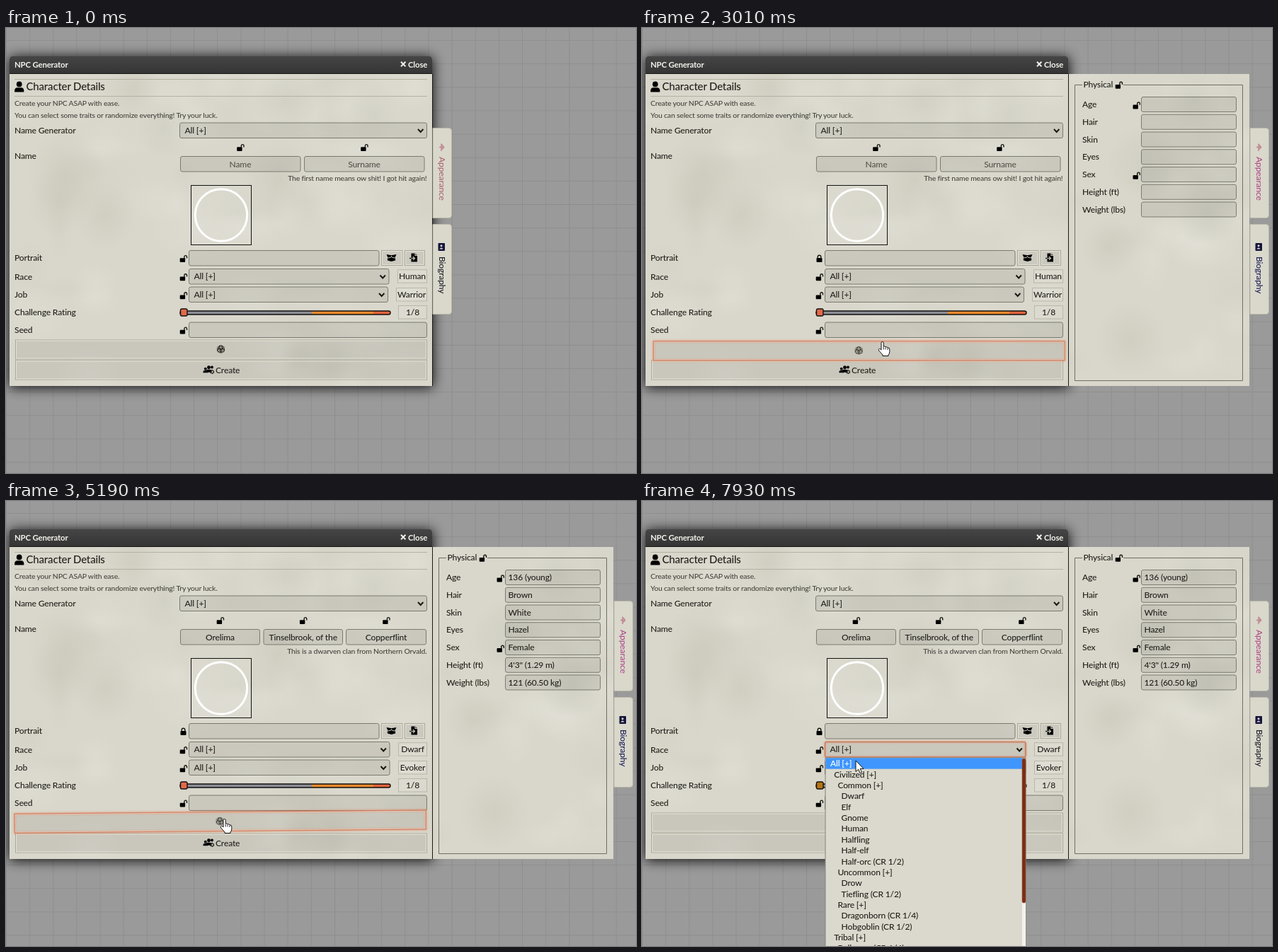
An HTML page for the animation above (8 s loop, 890 by 629 pixels).

```html
<!DOCTYPE html>
<html lang="en">
<head>
<meta charset="utf-8">
<title>NPC Generator</title>
<style>
  html, body { margin: 0; width: 100%; height: 100%; overflow: hidden; background: #9a9a9a; }
  svg { display: block; width: 890px; height: 629px; }
  text { font: 500 12.1px Lato, "Open Sans", sans-serif; letter-spacing: -.17px; fill: #22211c; white-space: pre; }
  .note { font-size: 10.4px; fill: #45443e; }
  .title { font-size: 11.4px; font-weight: bold; fill: #f2f1ea; }
  .heading { font-size: 15px; }
  .hint { fill: #55544c; }
  .box { fill: #000; fill-opacity: .07; stroke: #7b7a71; }
  .badge { fill: #fff; fill-opacity: .08; stroke: #b9b7a9; }
  .line { fill: none; stroke: #191813; stroke-width: 1.4; }
  .glow rect { fill: none; stroke: #e8683f; }
</style>
</head>
<body>
<svg viewBox="0 0 890 629">
  <defs>
    <radialGradient id="dark"><stop offset="0" stop-color="#b4b4a4"/><stop offset="1" stop-color="#b4b4a4" stop-opacity="0"/></radialGradient>
    <radialGradient id="light"><stop offset="0" stop-color="#e9e8e1"/><stop offset="1" stop-color="#e9e8e1" stop-opacity="0"/></radialGradient>
    <linearGradient id="header" x2="0" y2="1"><stop offset="0" stop-color="#454545"/><stop offset="1" stop-color="#343434"/></linearGradient>
    <pattern id="grid" width="33.14" height="33.14" patternUnits="userSpaceOnUse" y="17">
      <path d="M0 .5H34M.5 0V34" stroke="#8e8e8e"/>
    </pattern>
    <filter id="blur" x="-10%" y="-10%" width="120%" height="120%"><feGaussianBlur stdDeviation="9"/></filter>
    <clipPath id="mainClip"><rect x="5" y="65" width="597" height="441"/></clipPath>
    <clipPath id="sideClip"><rect x="603" y="65" width="255" height="441"/></clipPath>
  </defs>
  <g id="stage"></g>
</svg>
<script>
const LOOP = 8000;
const byId = id => document.getElementById(id);

// ---- drawing helpers (text y is the middle of the line) ----
const text = (x, y, s, cls = '', more = '') => `<text x="${x}" y="${y + 4.2}" class="${cls}" ${more}>${s}</text>`;
const centred = (x, y, s, cls) => text(x, y, s, cls, 'text-anchor="middle"');
const rightNote = s => text(594.5, 211.4, s, 'note', 'text-anchor="end"');
const rect = (x, y, w, h, more = '') => `<rect x="${x}" y="${y}" width="${w}" height="${h}" ${more}/>`;
const path = (d, more = '') => `<path d="${d}" ${more}/>`;
const group = (id, body, more = '') => `<g id="${id}" ${more}>${body}</g>`;
const at = (x, y, body) => `<g transform="translate(${x} ${y})">${body}</g>`;
const box = (x, y, w, h = 21.5) => rect(x, y, w, h, 'rx="2.5" class="box"');
const badge = (x, y, s) => rect(x, y - 9.5, 594.5 - x, 18.5, 'class="badge"') + centred((x + 594.5) / 2, y, s);
const select = (x, y, w) => box(x, y, w) + text(x + 7, y + 10.5, 'All [+]') +
  path(`M${x + w - 12.5} ${y + 9}l3.7 4 3.7-4`, 'class="line" style="stroke-width:2"');
const openLock = (x, y) => at(x, y, rect(-4.8, -.6, 7.4, 5.8, 'rx="1"') + path('M1.4 0V-2.4a1.8 1.8 0 0 1 3.6 0V-.4', 'class="line"'));
const closedLock = (x, y) => at(x, y, rect(-4, -.8, 8, 6, 'rx="1"') + path('M-2.3 0V-2.2a2.3 2.3 0 0 1 4.6 0V0', 'class="line"'));
const glow = (id, x, y, w, h, r = 1) => group(id,
  [[7, .06], [4.5, .1], [2.5, .18], [1, .45]].map(([sw, o]) =>
    rect(x, y, w, h, `rx="${r}" stroke-width="${sw}" stroke-opacity="${o}"`)).join(''), 'class="glow"');
const button = (x, y, w, h) => rect(x, y, w, h, 'fill="#000" fill-opacity=".075" stroke="#a5a496"') +
  rect(x + 1, y + 1, w - 2, h - 2, 'fill="none" stroke="#efede2" stroke-opacity=".8"');

let seed = 7;
const random = () => (seed = seed * 16807 % 2147483647) / 2147483647;
const blob = (x, y, rx, ry, tone, o) => `<ellipse cx="${x}" cy="${y}" rx="${rx}" ry="${ry}" fill="url(#${tone})" opacity="${o}"/>`;

function parchment(x, w, clip, stains) {
  let out = rect(x, 65, w, 441, 'fill="#d9d7cb"');
  for (let i = 0; i < w / 9; i++)
    out += blob(x + random() * w, 65 + random() * 441, 20 + random() * 50, 15 + random() * 40, i % 3 ? 'light' : 'dark', i % 3 ? .25 : .1);
  for (const [sx, sy, r] of stains) out += blob(sx, sy, r, r * 1.1, 'dark', .24);
  return `<g clip-path="url(#${clip})">${out}</g>`;
}

const person = (x, y, s) => `<g transform="translate(${x} ${y}) scale(${s})"><circle cy="-3.6" r="3.9"/>` +
  path('M-6.6 7.5V5.4Q-6.6 1.4-2.6 1.2H2.6Q6.6 1.4 6.6 5.4V7.5Z') + '</g>';
const d20 = at(303.5, 454, path('M0-6.2 5.4-3.1V3.1L0 6.2-5.4 3.1V-3.1Z', 'fill="#191813"') +
  path('M0-2.8 3 2.2H-3ZM0-6V-2.8M3 2.2 5 3M-3 2.2-5 3M0-2.8 5-3M0-2.8-5-3M3 2.2 5-3M-3 2.2-5-3M3 2.2 0 6-3 2.2', 'fill="none" stroke="#c9c8bb" stroke-width=".8"'));

// ---- window pieces ----
function mainWindow() {
  const stains = [[85, 205, 55], [75, 245, 45], [180, 85, 40], [395, 105, 45], [385, 215, 50], [225, 140, 40], [140, 265, 45], [520, 120, 40]];
  const labels = [['Name Generator', 144.5], ['Name', 180.5], ['Portrait', 324.5], ['Race', 351.5], ['Job', 377], ['Challenge Rating', 401.8], ['Seed', 426.5]];
  return rect(5, 41, 598, 467, 'fill="#000" opacity=".92" filter="url(#blur)"') +
    path('M5 65V45Q5 40 10 40H597Q602 40 602 45V65Z', 'fill="url(#header)"') +
    parchment(5, 597, 'mainClip', stains) +
    path('M5 64.5H602M602.5 65V506', 'stroke="#191813"') +
    text(12, 51.5, 'NPC Generator', 'title') + text(568, 51.5, 'Close', 'title') +
    path('M558 47.8l6.4 6.6M564.4 47.8l-6.4 6.6', 'stroke="#f2f1ea" stroke-width="2"') +
    path('M12 72.5H595M12 96.5H595', 'stroke="#b3b1a2"') +
    person(18.7, 83, 1) + text(28.5, 84, 'Character Details', 'heading') +
    text(12, 106.2, 'Create your NPC ASAP with ease.', 'note') +
    text(12, 122.6, 'You can select some traits or randomize everything! Try your luck.', 'note') +
    labels.map(([s, y]) => text(12, y, s)).join('') +
    select(245.5, 134, 349) +
    rect(261.5, 222.5, 85, 84, 'fill="#fff" fill-opacity=".06" stroke="#111"') +
    '<circle cx="304" cy="264.5" r="36.7" fill="none" stroke="#fff" stroke-width="3"/>' +
    box(258.5, 314.5, 268.5) + button(530.5, 314.5, 29.5, 21) + button(563.5, 314.5, 28, 21) +
    at(544.5, 324.5, path('M-7-4.5 0-3.2 7-4.5 5 0 1.5-.6 0-2.6-1.5-.6-5 0ZM-5.6 1-1.5.6 0-1 1.5.6 5.6 1V4L0 5.5-5.6 4Z')) +
    at(576, 324.5, path('M-3.5-6H2L5-3V6H-3.5Z') + path('M-6 1H1M-1.2-1.5 1.5 1-1.2 3.5M2-6V-3H5', 'fill="none" stroke="#c9c8bb" stroke-width="1.2"') + path('M-6 1H-3.5', 'class="line"')) +
    group('portraitOpen', openLock(250.5, 325.8)) + group('portraitClosed', closedLock(250.5, 325.8)) +
    [352, 378, 427.3].map(y => openLock(250.5, y)).join('') +
    box(258.5, 416, 336) + badge(554.5, 402, '1/8') +
    rect(246, 400, 297, 5, 'rx="2.5" fill="#8d8d95"') + rect(432, 400, 88, 5, 'fill="#ea8a2c"') +
    rect(519, 400, 24, 5, 'rx="2" fill="#e2633d"') +
    rect(246, 400, 297, 5, 'rx="2.5" fill="none" stroke="#111" stroke-width="1.4"') +
    rect(246.5, 397, 9.5, 10, 'id="thumb" rx="2" stroke="#111" stroke-width="1.4"') +
    button(13.5, 470, 581, 27) + glow('createGlow', 13.5, 470, 581, 27) +
    person(286.5, 482, .62) + person(281.8, 483.5, .5) +
    '<circle cx="291.2" cy="486" r="2.2" fill="none" stroke="#191813" stroke-width="1.7" stroke-dasharray="1.6 .5"/><circle cx="291" cy="479.5" r="2"/>' +
    text(296, 483.5, 'Create') +
    group('dice', button(13.5, 441, 581, 27) + glow('diceGlow', 13.5, 441, 581, 27) + group('diceIcon', d20));
}

const emptyForm = [331, 506].map(x => openLock(x, 168.8)).join('') +
  box(246.5, 181.5, 169.5) + box(421.5, 181.5, 169.5) +
  centred(331, 192.3, 'Name', 'hint') + centred(506, 192.3, 'Surname', 'hint') +
  rightNote('The first name means ow shit! I got hit again!') +
  select(258.5, 340.5, 282.5) + badge(553.5, 351.2, 'Human') +
  select(258.5, 366, 281) + badge(551.5, 377, 'Warrior');

const filledForm = [['Orelima', 246.5, 112], ['Tinselbrook, of the', 364, 111.5], ['Copperflint', 480.5, 113]]
    .map(([s, x, w]) => box(x, 181.5, w) + centred(x + w / 2, 192.3, s) + openLock(x + w / 2, 168.8)).join('') +
  rightNote('This is a dwarven clan from Northern Orvald.') +
  select(258.5, 340.5, 283.5) + badge(554.5, 351.2, 'Dwarf') +
  select(258.5, 366, 283.5) + badge(554.5, 377, 'Evoker');

const traits = [['Age', '136 (young)'], ['Hair', 'Brown'], ['Skin', 'White'], ['Eyes', 'Hazel'],
  ['Sex', 'Female'], ['Height (ft)', '4\'3" (1.29 m)'], ['Weight (lbs)', '121 (60.50 kg)']];
const traitY = i => 108 + i * 24.75;

const sidePanel = parchment(603, 255, 'sideClip', [[710, 190, 50], [660, 310, 40], [800, 260, 45], [690, 440, 50], [780, 100, 40]]) +
  path('M622 80.5H611.5V498.5H848.5V80.5H680', 'fill="none" stroke="#6f6e66"') +
  text(623.5, 80, 'Physical') + openLock(673.5, 80.5) + openLock(698.3, 109.2) + openLock(698.3, 208.5) +
  traits.map(([s], i) => text(622, traitY(i), s) + box(705.5, traitY(i) - 10.5, 134, 21)).join('');
const traitValues = traits.map(([, s], i) => text(709.5, traitY(i), s)).join('');

const tab = y => path(`M603 ${y}H625Q629.5 ${y} 629.5 ${y + 4}V${y + 123}Q629.5 ${y + 127} 625 ${y + 127}H603Z`, 'fill="#d9d8cb" stroke="#b9b7a9"');
const vertical = (y, s, id) => `<text id="${id}" transform="translate(612 ${y}) rotate(90)">${s}</text>`;
const tabs = tab(141.5) + tab(277.5) + glow('tabGlow', 602, 141, 28, 128, 4) +
  path('M615 163.5V174M612 168.5h6M616 165l2.5 3.5-2.5 3', 'fill="none" stroke="#b5627c" stroke-width="1.5" opacity=".7"') +
  vertical(182, 'Appearance', 'appearance') + vertical(323, 'Biography', 'biography') +
  rect(610.5, 304, 9.5, 11, 'rx="1" fill="#14143c"') +
  '<circle cx="615" cy="307.8" r="1.5" fill="#d9d8cb"/>' + path('M612.4 312.5q2.6-4 5.2 0Z', 'fill="#d9d8cb"');

const options = [[0, 'All [+]'], [1, 'Civilized [+]'], [2, 'Common [+]'],
  ...['Dwarf', 'Elf', 'Gnome', 'Human', 'Halfling', 'Half-elf', 'Half-orc (CR 1/2)'].map(s => [3, s]),
  [2, 'Uncommon [+]'], [3, 'Drow'], [3, 'Tiefling (CR 1/2)'], [2, 'Rare [+]'], [3, 'Dragonborn (CR 1/4)'],
  [3, 'Hobgoblin (CR 1/2)'], [1, 'Tribal [+]'], [2, 'Bullywug (CR 1/4)']];
const dropdown = rect(259, 363, 283, 270, 'fill="#dbd9cd" stroke="#85847b"') +
  rect(259.5, 363.3, 278, 15.4, 'fill="#3f96fd"') +
  options.map(([level, s], i) => text(266 + level * 5.2, 371 + i * 15.37, s, '', i ? '' : 'style="fill:#fff"')).join('') +
  rect(537, 364, 5, 265, 'fill="#f3f2ee"') + rect(537, 364, 5, 204, 'rx="2" fill="#782e16" stroke="#a5583a" stroke-width=".6"');

const hand = path('M-2 1.6Q-2 0-.4 0T1.2 1.6V6.6Q3.2 5.6 4 7.4 6.2 6.6 7 8.5 9.8 8 9.8 10.8V14Q9.8 17 8 18.6V20H0V18.6L-5.4 12.4Q-6.4 10.4-4.6 9.8-3.4 9.8-2 11.6Z', 'fill="#fff" stroke="#111"') +
  path('M1.2 7v4M4 8v3M7 9v2.5', 'stroke="#111" stroke-width=".9"');
const arrow = path('M0 0V15.6L3.7 12.3 6 17.6 8.5 16.5 6.2 11.4H11Z', 'fill="#fff" stroke="#111"');

byId('stage').innerHTML = rect(0, 0, 890, 629, 'fill="#9a9a9a"') + rect(0, 0, 890, 629, 'fill="url(#grid)"') +
  mainWindow() + group('empty', emptyForm) + group('filled', filledForm) +
  glow('raceGlow', 258.5, 340.5, 283.5, 21.5, 2.5) +
  group('panel', sidePanel + group('values', traitValues)) + group('tabs', tabs) + group('menu', dropdown) +
  group('cursor', '<circle id="click" cx="-.5" cy="1" r="10" fill="#ece62e" opacity=".8"/>' + group('hand', hand) + group('arrow', arrow));

// ---- timeline: bursts of evenly spaced steps [start, end, steps] ----
const bursts = [[280, 1000, 6], [1290, 2010, 6], [2720, 3720, 8], [3870, 4890, 8], [5040, 6060, 8], [6210, 6640, 4], [6930, 7070, 2], [7930, 7930, 1]];
const STEP = { lock: 7, tabClick: 11, open: 12, dice: 15, roll: 17, leave: 37, race: 39, menu: 40 };
const cursorPath = [[1, 318, 478], [2, 306, 450], [6, 250, 327], [7, 250, 327], [10, 596, 247], [11, 617, 240], [12, 617, 240],
  [15, 340, 443.5], [17, 309, 449.5], [36, 309, 449.5], [39, 300, 353], [40, 300, 352], [41, 300, 359], [42, 301, 367], [43, 302, 367]];
const shakePhase = [[2, .1], [15, .3], [19, 1.08], [26, 2.83], [34, 5.42], [36, 6]];
const shakePose = [[1, 1, 0], [-1, -2, -1], [-3, 0, 1], [3, 2, 0], [1, -1, 1], [-1, 2, -1], [-3, 1, 0], [3, 1, -1], [-1, -1, 1], [1, 2, 0], [1, -2, -1]];

function stepAt(t) {
  let n = 0;
  for (const [start, end, count] of bursts) {
    if (t < start) break;
    const gap = (end - start) / (count - 1) || 1;
    n += Math.min(count, 1 + Math.floor((t - start) / gap + 1e-6));
  }
  return n;
}

// Linear interpolation through rows of [key, ...values].
function along(rows, key) {
  const i = Math.max(1, rows.findIndex(r => r[0] >= key));
  const a = rows[i - 1], b = rows[i], k = (key - a[0]) / (b[0] - a[0]);
  return a.slice(1).map((v, j) => v + (b[j + 1] - v) * k);
}

const show = (id, on) => byId(id).style.display = on ? '' : 'none';

function render(t) {
  const n = stepAt(t);
  const shaking = n === 2 || (n >= STEP.dice && n < STEP.leave);
  const open = n >= STEP.open, rolled = n >= STEP.roll, tabHover = n === STEP.tabClick;

  show('portraitOpen', n < STEP.lock);
  show('portraitClosed', n >= STEP.lock);
  show('createGlow', n === 1);
  show('diceGlow', shaking);
  show('tabGlow', tabHover);
  show('panel', open);
  show('empty', !rolled);
  show('filled', rolled);
  show('values', rolled);
  show('raceGlow', n >= STEP.race);
  show('menu', n >= STEP.menu);
  byId('diceIcon').style.opacity = shaking ? .8 : 1;
  byId('thumb').style.fill = n > STEP.leave ? '#b8740f' : '#e2694a';
  byId('tabs').setAttribute('transform', `translate(${open ? 256 : 0} 0)`);
  byId('appearance').style.fill = open ? '#b0498a' : '#ad6474';
  byId('biography').style.fill = open && n < STEP.menu ? '#1c1c58' : '#1c1c26';

  let pose = '';
  if (shaking) {
    const phase = along(shakePhase, n)[0] % 1 * 10;
    const [x, y, turn] = along(shakePose.map((p, i) => [i, ...p]), phase);
    pose = `translate(${x * .9} ${y * .9}) rotate(${turn} 304 454.5)`;
  }
  byId('dice').setAttribute('transform', pose);

  show('cursor', n > 0);
  if (n > 0) {
    const pointing = shaking || [1, 6, STEP.lock, STEP.tabClick].includes(n);
    byId('cursor').setAttribute('transform', `translate(${along(cursorPath, n).join(' ')})`);
    show('hand', pointing);
    show('arrow', !pointing);
    show('click', [STEP.lock, STEP.tabClick, STEP.roll].includes(n));
  }
}

function tick() {
  render(performance.now() % LOOP);
  requestAnimationFrame(tick);
}
tick();
</script>
</body>
</html>
```
